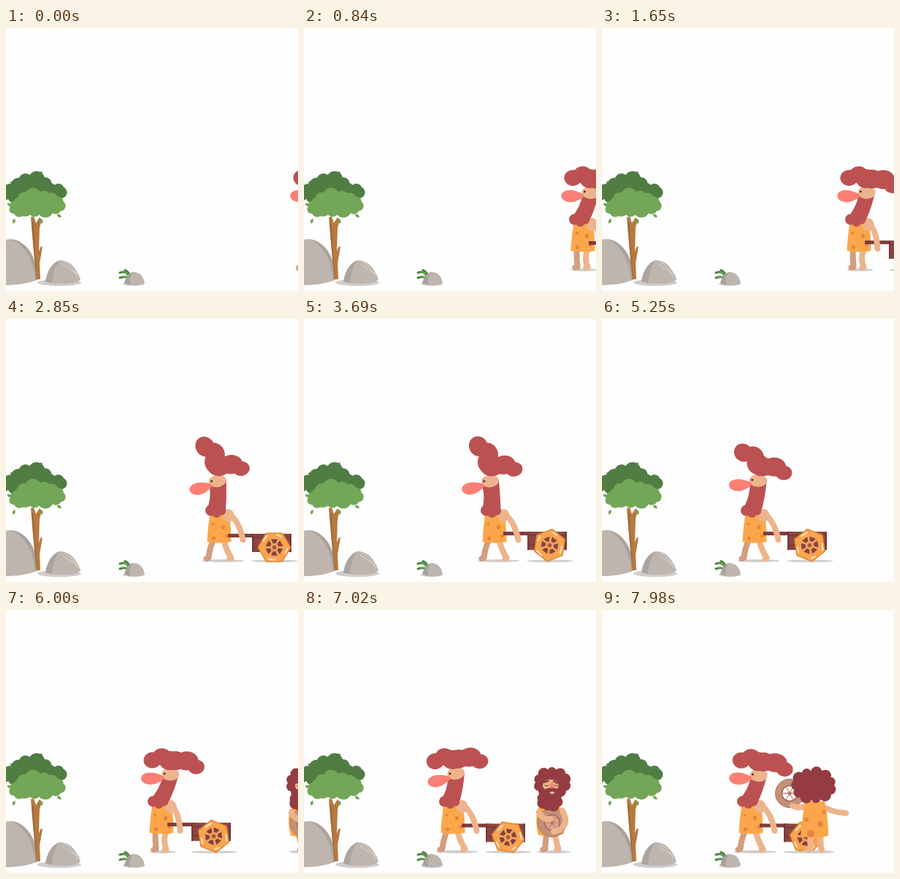
Animation, 400 px wide and 360 px high, one loop 8000 ms. Source, as an HTML page:

```html
<!DOCTYPE html>
<html lang="en">
<head>
<meta charset="utf-8">
<title>Stone age cart</title>
<style>
  html, body { margin: 0; width: 100%; height: 100%; overflow: hidden; background: #fefefe; }
  svg { display: block; width: 100vw; height: 100vh; }
  .shadow { fill: #cfcdcc; }
  .hair { fill: #bc5152; }
  .mane { fill: #953b42; }
  .skin { fill: #edb48c; }
  .tunic { fill: #fba64a; }
  .spot { fill: #e5833f; }
  .limb { fill: none; stroke: #edb48c; stroke-width: 8; stroke-linecap: round; stroke-linejoin: round; }
  .far { stroke: #d39d80; }
  .line { fill: none; stroke-linecap: round; }
</style>
</head>
<body>
<svg viewBox="0 0 400 360">
  <defs>
    <g id="ring">
      <circle r="15" fill="none" stroke="#c39078" stroke-width="9"/>
      <circle r="19.5" fill="none" stroke="#a87561"/>
      <circle r="10.5" fill="none" stroke="#a06a58" stroke-width="1.5"/>
      <path d="M-10 0H10M-5-9L5 9M5-9L-5 9" stroke="#d08b72" stroke-width="1.3"/>
      <circle r="2.5" fill="#c06e5b"/>
    </g>
    <path id="leaf" d="M0 0Q-5-4 0-9Q5-4 0 0Z"/>
  </defs>

  <!-- scenery -->
  <g>
    <ellipse class="shadow" cx="73" cy="348.5" rx="30" ry="4.5"/>
    <path d="M-4 291Q8 286 20 293Q41 306 45 343Q30 352-4 352Z" fill="#bdb5ae"/>
    <path d="M8 289Q37 294 45 343L40 346Q37 304 8 289Z" fill="#aaa29c"/>
    <path d="M42 344Q37 300 34 259L38 258L41 267L46 259L49 263L46 273L45 306L47 300L50 299L48 311L46 322L47 344Z" fill="#b6793f"/>
    <path d="M42 344Q37 300 35 264L38 268Q39 305 43 344Z" fill="#a46a38"/>
    <g id="crown" fill="#4f7d42"></g>
    <g id="leaves"></g>
    <g id="crownFront" fill="#73a657"></g>
    <path d="M54 347Q58 324 73 318Q92 317 102 344Q96 351 73 350Q60 350 54 347Z" fill="#bdb5ae"/>
    <path d="M54 347Q58 324 73 318Q64 330 63 349Z" fill="#aca49e"/>
    <path class="line" d="M80 320Q92 326 98 341M77 323Q86 330 101 338" stroke="#dad5d0"/>
    <ellipse class="shadow" cx="175" cy="350" rx="15" ry="3"/>
    <path class="line" d="M168 346Q167 338 156 342M169 345Q168 331 156 335M169 343Q170 334 163 331.5" stroke="#4f8744" stroke-width="3"/>
    <path class="line" d="M167 344Q166 339 160 340M169 341Q168 335 163 334" stroke="#8dbb6d"/>
    <path d="M162 349Q166 336 174 334Q187 334 190 349Q184 353 174 352Q166 352 162 349Z" fill="#bdb5ae"/>
    <path d="M162 349Q166 336 174 334Q168 342 170 352Z" fill="#a9a19b"/>
  </g>

  <!-- puller, lower half -->
  <ellipse id="manShadow" class="shadow" cy="331" ry="1.9"/>
  <g id="manBody">
    <path id="legFar" class="limb far"/>
    <path id="legNear" class="limb"/>
    <path class="tunic" d="M-11 262Q4 258 14 264Q17 284 17 305Q2 308-16 305Q-15 282-11 262Z"/>
    <g class="spot">
      <circle cx="-7" cy="300" r="2.6"/><ellipse cx="6" cy="285" rx="2.4" ry="3"/>
      <circle cx="-8" cy="281" r="2"/><circle cx="11" cy="297" r="2.2"/>
    </g>
  </g>

  <!-- cart -->
  <ellipse id="cartShadow" class="shadow" cy="331.3" rx="32" ry="1.7"/>
  <g id="cart">
    <rect x="-33" y="294" width="40" height="5" fill="#7e3d3c"/>
    <rect y="294" width="54" height="25" fill="#8b4642"/>
    <path d="M0 299H54M0 312H54" stroke="#753837" stroke-width="1.5"/>
    <path d="M1 294V319M53 294V319" stroke="#753837" stroke-width="2"/>
  </g>
  <g id="wheel">
    <path id="hex" fill="#faa54c" stroke="#dc8a3d" stroke-width="1.5" stroke-linejoin="round"/>
    <circle r="13" fill="#f0a05a"/>
    <g id="holes" fill="#83413f"></g>
    <circle r="2.8" fill="#a8593f"/>
    <path class="line" d="M-15-9L-10-16M-8 16L1 17M15 8L18 2M4-17L9-15" stroke="#fde0bd" stroke-width="2.2"/>
  </g>

  <!-- puller, upper half -->
  <g id="manTop">
    <ellipse class="skin" cx="13" cy="269" rx="8" ry="9"/>
    <path id="arm" class="limb" stroke-width="9"/>
    <path id="beard" class="hair"/>
    <g class="hair">
      <circle cx="-11" cy="262" r="7.5"/><circle cx="-3" cy="266" r="6"/><circle cx="4" cy="263" r="5.5"/>
    </g>
    <g id="head">
      <ellipse class="skin" cx="8" cy="1" rx="12" ry="8.5"/>
      <circle r="1.5" fill="#5b3226"/>
      <path d="M-32 7C-31-2-16-4-1 4C0 8-4 10-8 12C-17 18-31 16-32 7Z" fill="#fb7f74"/>
      <g class="hair">
        <ellipse cx="14" cy="-18" rx="16" ry="13"/><ellipse cx="30" cy="-18" rx="16" ry="13"/>
        <ellipse cx="43" cy="-10" rx="11.5" ry="10"/>
        <g id="quiff">
          <ellipse cx="-17" cy="-18" rx="12" ry="11"/><ellipse cx="-4" cy="-23" rx="13" ry="11.5"/>
          <ellipse cx="6" cy="-18" rx="14" ry="13"/>
        </g>
      </g>
    </g>
  </g>

  <!-- wheel maker -->
  <g id="maker">
    <ellipse class="shadow" cx="4" cy="331" rx="23" ry="2"/>
    <g id="front">
      <path id="stepA" class="limb far"/>
      <path id="stepB" class="limb"/>
      <path class="tunic" d="M-18 272Q0 264 17 272L18 306Q2 313-17 308Q-22 290-18 272Z"/>
      <circle class="spot" cx="-12" cy="300" r="2.5"/><circle class="spot" cx="-14" cy="284" r="2"/>
      <circle cx="2" cy="291" r="13" fill="#d6a58c"/>
      <use href="#ring" x="2" y="291"/>
      <path class="limb" d="M16 275Q26 292 12 301L4 303" stroke-width="7"/>
      <path class="limb" d="M-16 277Q-10 288 0 286" stroke-width="7"/>
      <g id="frontHair" class="mane"></g>
      <ellipse class="skin" cx="0" cy="240" rx="11" ry="8"/>
      <path class="line" d="M-9 236L-3 234M4 234L9 237" stroke="#853339" stroke-width="2"/>
      <path class="line" d="M-8 240Q-5 242-3 240M6 240Q8 242 10 240" stroke="#5b3226"/>
      <ellipse cx="2" cy="241" rx="3.5" ry="5" fill="#f08a78"/>
      <path class="mane" d="M-14 247Q2 240 15 247L10 255H-10Z"/>
      <ellipse cx="2" cy="250" rx="3" ry="1.6" fill="#f0c3a6"/>
    </g>
    <g id="back">
      <use id="backRing" href="#ring"/>
      <path class="limb" d="M-5 308L-5 327L-8 328M8 308L9 327L10 328"/>
      <path id="backArm" class="limb"/>
      <path class="limb" d="M13 270Q26 277 43 278" stroke-width="9"/>
      <path class="tunic" d="M-13 262H14Q19 285 19 309Q0 315-19 309Q-17 285-13 262Z"/>
      <g class="spot">
        <circle cx="-5" cy="306" r="5"/><circle cx="8" cy="293" r="4"/>
        <circle cx="-11" cy="287" r="3"/><circle cx="13" cy="277" r="2.5"/>
      </g>
      <g id="backHair" class="mane"></g>
    </g>
  </g>
</svg>

<script>
const LOOP = 8000, BEAT = 812, FIRST = 30, GROUND = 332.5, RADIUS = 23;
const $ = id => document.getElementById(id);
const set = (id, name, value) => $(id).setAttribute(name, value);
const place = (id, value) => set(id, 'transform', value);
const clamp = v => Math.max(0, Math.min(1, v));
const ease = v => (1 - Math.cos(Math.PI * clamp(v))) / 2;
const ramp = (t, a, b) => ease((t - a) / (b - a));
const mix = (a, b, k) => a + (b - a) * k;

// A lumpy mass: one ellipse with puffs around its rim.
function puffs(id, cx, cy, rx, ry, count, r) {
  let shapes = `<ellipse cx="${cx}" cy="${cy}" rx="${rx}" ry="${ry}"/>`;
  for (let i = 0; i < count; i++) {
    const a = i / count * 2 * Math.PI + 0.3;
    const size = r * (1 + 0.15 * Math.sin(i * 2.4));
    shapes += `<circle cx="${cx + rx * Math.cos(a)}" cy="${cy + ry * Math.sin(a)}" r="${size}"/>`;
  }
  $(id).innerHTML += shapes;
}
puffs('crown', 36, 218, 20, 11, 8, 10);
puffs('crown', 66, 224, 10, 4, 5, 8);
puffs('crown', 8, 226, 14, 5, 6, 8);
puffs('crownFront', 42, 240, 22, 10, 9, 10);
puffs('crownFront', 18, 247, 8, 4, 5, 7);
puffs('crownFront', 68, 242, 7, 5, 5, 7);
puffs('frontHair', 2, 236, 19, 15, 10, 7);
puffs('frontHair', -1, 260, 11, 9, 8, 7);
puffs('backHair', -1, 240, 24, 18, 11, 7.5);

[[47, 203, 15], [10, 216, -30], [8, 243, -70], [70, 255, 125], [12, 261, 200], [48, 261, 170]].forEach(([x, y, turn], i) => {
  $('leaves').innerHTML += `<use href="#leaf" fill="${i < 2 ? '#4f7d42' : '#73a657'}" transform="translate(${x} ${y}) rotate(${turn}) scale(.8)"/>`;
});

const polar = (r, deg) => `${r * Math.cos(deg * Math.PI / 180)} ${r * Math.sin(deg * Math.PI / 180)}`;
const sides = [0, 60, 120, 180, 240, 300];
set('hex', 'd', 'M' + sides.map(a => polar(RADIUS - 0.7, a)).join('L') + 'Z');
$('holes').innerHTML = sides.map(a =>
  `<path d="M${polar(6, a + 12)}L${polar(12, a + 9)}L${polar(12, a + 51)}L${polar(6, a + 48)}Z"/>`).join('');

// Cart position at the start of each beat.
const stops = [464, 423, 393, 365, 337, 306, 276, 254, 254, 249, 249];

// phase, head x, head y, head tilt, quiff lift
const heave = [
  [0, -2, 0, 3, 0], [150, 1, -1, 5, 0], [300, 2, -6, 14, 0], [390, -15, -2, -10, 66],
  [425, -20, -2, -8, 66], [480, -9, 0, -10, 4], [570, -2, 0, 3, 0], [900, -2, 0, 3, 0]
];
const sway = [[0, -2, 0, 3, 0], [270, 0, 0, 1, 0], [430, -11, -3, 3, 0], [570, -2, 0, 3, 0], [900, -2, 0, 3, 0]];
const rest = [[0, -2, 1, 4, 0], [900, -2, 1, 4, 0]];

function pose(keys, phase) {
  const i = keys.findIndex(key => key[0] > phase);
  const a = keys[i - 1], b = keys[i];
  const k = ramp(phase, a[0], b[0]);
  return a.slice(1).map((v, n) => mix(v, b[n + 1], k));
}

function drawCart(x) {
  const turn = (337 - x) * 2.63;
  const lean = ((turn % 60) + 60) % 60;
  const cy = GROUND - RADIUS * Math.cos((30 - lean) * Math.PI / 180);
  place('cart', `translate(${x} ${cy - 312.6})`);
  place('wheel', `translate(${x + 30.5} ${cy}) rotate(${-turn})`);
  set('cartShadow', 'cx', x + 31);
}

function drawPuller(beat, phase, cartX) {
  const opening = beat === 0 || beat > 8 ? 1 : beat === 7 ? 0 : ramp(phase, 60, 280);
  const spread = opening * (beat > 7 ? 1 : 1 - ramp(phase, 470, 570));
  const x = cartX - mix(41.5, 45.5, spread);
  const keys = beat === 7 ? sway : beat > 8 ? rest : heave;
  const [hx, hy, tilt, lift] = pose(keys, phase);

  place('manBody', `translate(${x} 0)`);
  place('manTop', `translate(${x} 0)`);
  set('manShadow', 'cx', x + mix(2, 6, spread));
  set('manShadow', 'rx', mix(18, 29, spread));

  const left = mix(-7, -14, spread), right = mix(7, 17, spread);
  set('legFar', 'd', `M-8 303Q${mix(-8, -13, spread)} 316 ${left} 327L${left - 3} 328`);
  set('legNear', 'd', `M7 303Q${mix(2, 10, spread)} 316 ${right} 327L${right - 2} 328`);
  set('arm', 'd', `M13 267Q${mix(24, 27, spread)} 274 ${mix(26, 33, spread)} 302`);
  set('beard', 'd', `M${hx + 2} ${hy + 229}L${hx + 25} ${hy + 222}Q${hx * 0.6 + 20} 245 9 265L-17 262Q${hx * 0.5 - 2} 246 ${hx + 2} ${hy + 229}Z`);
  place('head', `translate(${hx + 5} ${hy + 224}) rotate(${tilt})`);
  place('quiff', `rotate(${lift} 12 -17) translate(12 -17) scale(${1 + lift / 400}) translate(-12 17)`);
}

function drawMaker(t) {
  const x = Math.max(291, 338 - (t - 7020) * 0.0676);
  const turned = t >= 7600;
  place('maker', `translate(${x} 0)`);
  set('front', 'display', turned ? 'none' : 'inline');
  set('back', 'display', turned ? 'inline' : 'none');

  const swing = Math.sin((t - 7020) / BEAT * 2 * Math.PI + 1.2);
  const bob = Math.abs(swing);
  place('front', `translate(0 ${1 - bob})`);
  set('stepA', 'd', `M-6 306L${-3 - 5 * swing} 327l-3 1`);
  set('stepB', 'd', `M5 306L${3 + 8 * swing} 327l-2 1`);

  const reach = ramp(t, 7600, 7780) * 46 - ramp(t, 7780, 7920) * 12;
  const ringY = 285 - 34 * ramp(t, 7600, 7800);
  set('backRing', 'x', -reach);
  set('backRing', 'y', ringY);
  set('backArm', 'd', `M-12 269Q-22 272 ${-reach + 4} ${ringY + 17}`);
}

function frame(now) {
  const t = Math.max(0, now - start) % LOOP;
  const clock = Math.max(0, t - FIRST);
  const beat = Math.floor(clock / BEAT);
  const phase = clock % BEAT;
  const cartX = mix(stops[beat], stops[beat + 1], ramp(phase, 20, 320));
  drawCart(cartX);
  drawPuller(beat, phase, cartX);
  drawMaker(t);
  requestAnimationFrame(frame);
}
const start = performance.now();
frame(start);
</script>
</body>
</html>
```
